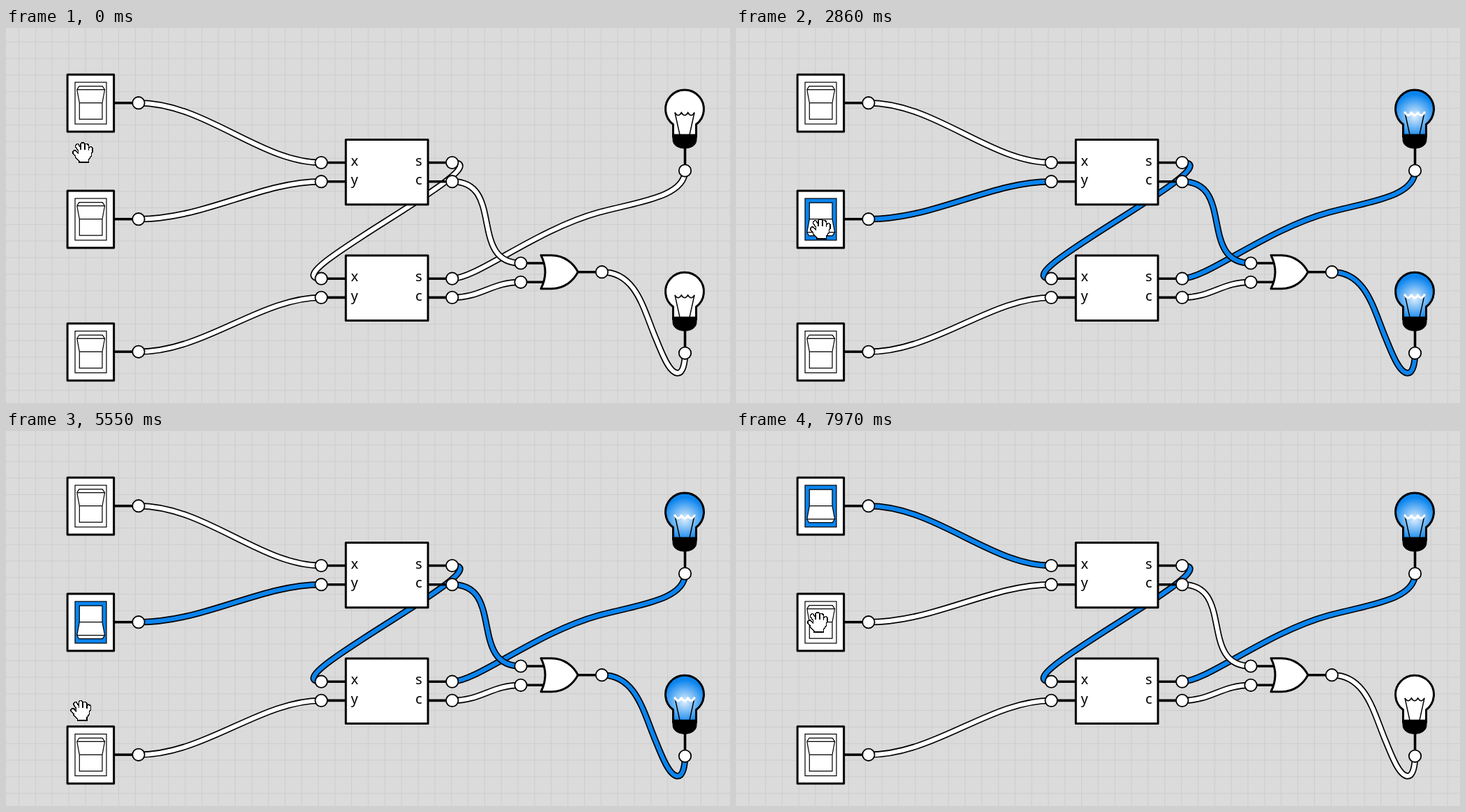
These frames come from a looping animation (1038x539 px, 8 s). An HTML page:

```html
<!DOCTYPE html>
<html lang="en">
<head>
<meta charset="utf-8">
<title>Logic circuit</title>
<style>
  html, body { margin: 0; width: 100%; height: 100%; overflow: hidden; background: #dbdbdb; }
  svg { display: block; width: 1038px; height: 539px; }
  text { font: 20px "Noto Sans", "Open Sans", sans-serif; fill: #000; }
  path, rect, circle { stroke: #000; fill: none; }
  .grid { stroke: #cdcdcd; stroke-width: 1; }
  .edge { stroke-width: 9.4; }
  .core { stroke: #fff; stroke-width: 6; }
  .on .core { stroke: #0a84ee; }
  .body { fill: #fff; stroke-width: 3; stroke-linejoin: round; }
  .stub { stroke-width: 3.6; }
  .node { fill: #fff; stroke-width: 1.8; }
  .well, .rocker { fill: #fff; stroke-width: 1.2; }
  .on .well { fill: #0a84ee; }
  .on .rocker { transform: scaleY(-1); }
  .thin, .wave { stroke-width: 1.5; }
  .cap { fill: #000; }
  .on .wave { stroke: #fff; stroke-width: 3.2; stroke-linecap: round; stroke-linejoin: round; }
  .on .glass { fill: url(#glow); }
  .hand { fill: #fff; stroke-width: .8; shape-rendering: crispEdges; }
</style>
</head>
<body>
<svg id="stage" viewBox="0 0 1038 539">
  <defs>
    <radialGradient id="glow" gradientUnits="userSpaceOnUse" cx="0" cy="10" r="31">
      <stop offset="0" stop-color="#e0effd"/>
      <stop offset="1" stop-color="#0a84ee"/>
    </radialGradient>
  </defs>
</svg>
<script>
const stage = document.getElementById('stage');
const LOOP = 8000;
const TICK = 80;

function add(parent, tag, attrs, text) {
  const el = document.createElementNS('http://www.w3.org/2000/svg', tag);
  for (const key in attrs) el.setAttribute(key, attrs[key]);
  if (text) el.textContent = text;
  parent.appendChild(el);
  return el;
}
const group = (x = 0, y = 0) => add(stage, 'g', { transform: `translate(${x} ${y})` });
const line = (parent, cls, d) => add(parent, 'path', { class: cls, d });
const node = (parent, cx, cy) => add(parent, 'circle', { class: 'node', cx, cy, r: 8.7 });

function drawGrid(step, left, top) {
  let d = '';
  for (let x = left; x < 1038; x += step) d += `M${x} 0V539`;
  for (let y = top; y < 539; y += step) d += `M0 ${y}H1038`;
  line(stage, 'grid', d);
}

function wire(d) {
  const g = group();
  line(g, 'edge', d);
  line(g, 'core', d);
  return g;
}

// Wire that leaves and arrives level, with handles of length h1 and h2
const curve = (x1, y1, x2, y2, h1, h2 = h1) =>
  wire(`M${x1} ${y1}C${x1 + h1} ${y1} ${x2 - h2} ${y2} ${x2} ${y2}`);

const input = (y1, y2) => curve(190, y1, 452, y2, 95, 87);

function makeSwitch(y) {
  const g = group(121.3, y);
  line(g, 'stub', 'M34 0H62');
  add(g, 'rect', { class: 'body', x: -33.2, y: -40.6, width: 66.6, height: 82 });
  add(g, 'rect', { class: 'well', x: -22.3, y: -29.7, width: 45, height: 60 });
  line(g, 'rocker', 'M-16 0L-19.5 -19L-16.5 -24H17L20.3 -19L16.7 0V23.5H-16ZM-19.5 -19H20.3M-16 0H16.7');
  node(g, 68.7, 0);
  return g;
}

function makeBox(y) {
  const g = group(0, y);
  add(g, 'rect', { class: 'body', x: 487.2, y: .4, width: 117.8, height: 93.4 });
  [['x', 's', 33.5], ['y', 'c', 60.7]].forEach(([left, right, py]) => {
    line(g, 'stub', `M452 ${py}H487M605 ${py}H640`);
    add(g, 'text', { x: 494.5, y: py + 4.2 }, left);
    add(g, 'text', { x: 596.6, y: py + 4.2, 'text-anchor': 'end' }, right);
    node(g, 452, py);
    node(g, 639.7, py);
  });
}

function makeGate() {
  const g = group(0, 350.7);
  line(g, 'stub', 'M738 -12.7H773M738 14.6H773M820 0H854');
  line(g, 'body', 'M767 -24H782C801 -24 814 -12 820 0C814 12 801 24 782 24H767Q779 0 767 -24Z');
  node(g, 738, -12.7);
  node(g, 738, 14.6);
  node(g, 854.3, 0);
}

function makeBulb(y) {
  const g = group(973, y);
  line(g, 'stub', 'M.5 50V88');
  line(g, 'body glass', 'M-16.5 40V22A27.5 27.5 0 1 1 16.5 22V40Z');
  line(g, 'thin', 'M-7 37L-14 5M7 37L14 5');
  line(g, 'wave', 'M-14 5' + 'q4.67 8 9.33 0'.repeat(3));
  line(g, 'cap', 'M-17 36.5H17V44C17 52 9 56.5 0 56.5S-17 52 -17 44Z');
  node(g, .5, 88.5);
  return g;
}

drawGrid(23.85, 18.5, 20);
const wires = {
  a: input(107.7, 193.5),
  b: input(274.7, 220.7),
  c: input(465.3, 387.4),
  diff: curve(640, 193.5, 452, 360, 75),
  out: wire('M640 360C675 360 760 290 850 265C905 250 973.5 243 973.5 205'),
  borrow1: curve(640, 220.7, 738, 338, 75),
  borrow2: curve(640, 387.4, 738, 365.3, 42),
  carry: wire('M854.3 350.7C904 350.7 914 405 932 447C942 472 952 496 963 496C971 496 973.5 480 973.5 467')
};
const switches = [107.7, 274.7, 465.3].map(makeSwitch);
makeBox(160);
makeBox(326.7);
makeGate();
const bulbs = [116.5, 378.8].map(makeBulb);

const hand = add(stage, 'g');
line(hand, 'hand', `M1.5 6.5H2.5L4.5 8.5V6.5L2.5 3.5V2.5L3.5 1.5H4.5L6.5 4.5V1.5
  L7.5 .5H8.5L9.5 1.5H11.5L12.5 2.5V4.5L14 3.5L15.5 4.5V7.5L14.5 8.5V10.5L12.5 13.5V15.5
  H5.5V14.5L2.5 11.5V10.5L.5 8.5V7.5ZM6.5 4.5V6M9.5 1.5V6M12.5 4.5V6.5`);

// Times at which each switch flips
const flips = [[930, 2190, 7480], [2860, 3340, 3740, 6690], [4440, 5380]];

// Pointer glides: first step, last step, end point
const origin = [110, 179];
const glides = [
  [70, 130, 96, 166],
  [290, 700, 121, 101],
  [1170, 1240, 132, 133],
  [1890, 1970, 133, 123],
  [2270, 2610, 121, 289],
  [3890, 4280, 128, 480],
  [5460, 6370, 131.5, 224],
  [6460, 6540, 130, 269],
  [6770, 7400, 123.5, 113],
  [7480, 7740, 85, 302],
  [7820, 7970, 117, 275]
];

// Each glide slows down, moves once per tick and bows to the left
function pointerAt(t) {
  let [x, y] = origin;
  for (const [t0, t1, ex, ey] of glides) {
    if (t < t0) break;
    const last = Math.round((t1 - t0) / TICK);
    const step = t >= t1 ? last : Math.floor((t - t0) / TICK);
    const k = Math.min(1, (step + 1) / (last + 1));
    const u = k * (2 - k);
    x += (ex - x) * u - .4 * Math.abs(ey - y) * u * (1 - u);
    y += (ey - y) * u;
  }
  return [x, y];
}

const light = (el, on) => el.classList.toggle('on', on);

function render(t) {
  const [a, b, c] = flips.map(list => list.filter(at => at <= t).length % 2 === 1);
  const diff = a !== b, out = diff !== c;
  const borrow1 = !a && b, borrow2 = !diff && c, carry = borrow1 || borrow2;
  const state = { a, b, c, diff, out, borrow1, borrow2, carry };
  for (const key in wires) light(wires[key], state[key]);
  [a, b, c].forEach((on, i) => light(switches[i], on));
  [out, carry].forEach((on, i) => light(bulbs[i], on));
  const [x, y] = pointerAt(t);
  hand.setAttribute('transform', `translate(${x - 15.2} ${y - 15.2}) scale(1.9)`);
}

const start = performance.now();
function tick() {
  render((performance.now() - start) % LOOP);
  requestAnimationFrame(tick);
}
tick();
</script>
</body>
</html>
```
